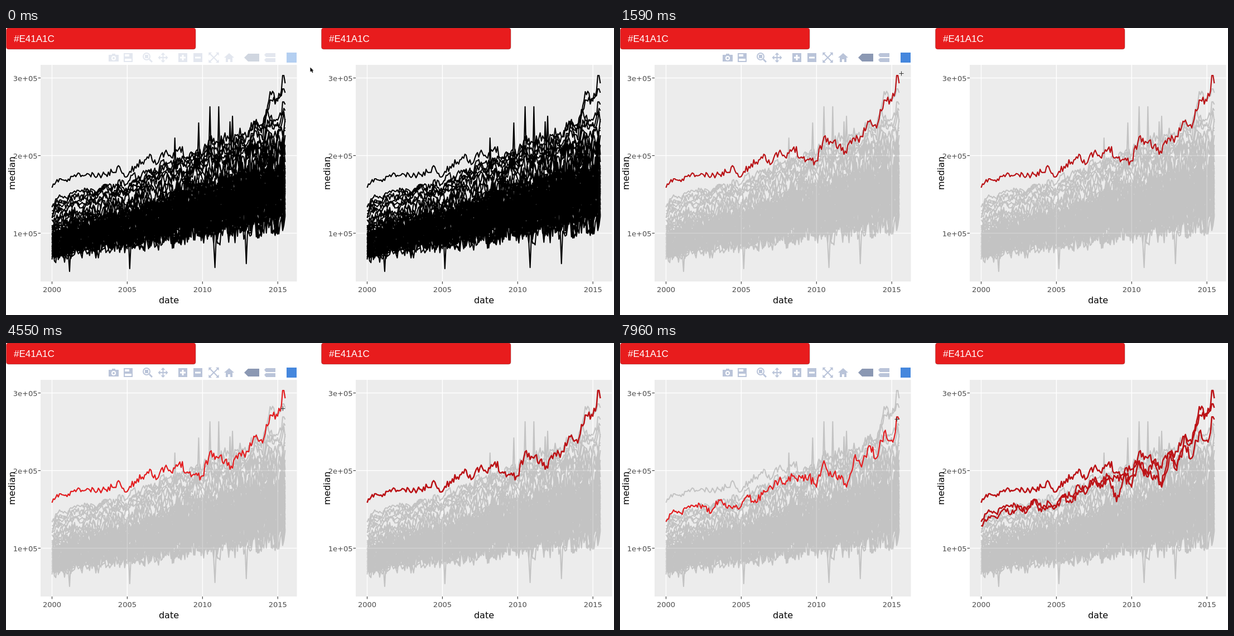
An HTML page with a canvas that plays this animation: 1090x514 px, repeating every 8000 ms.

```html
<!DOCTYPE html>
<html lang="en">
<head>
<meta charset="utf-8">
<title>Linked line charts</title>
<style>
html, body { margin: 0; width: 100%; height: 100%; overflow: hidden; background: #fff; }
canvas { display: block; }
</style>
</head>
<body>
<canvas id="stage" width="1090" height="514"></canvas>
<script>
const ctx = document.getElementById('stage').getContext('2d');
const LOOP = 8000, LAST = 186, X0 = 82.5, STEP = 2.247, RIGHT = 565;
const BRIGHT = '#e61c1f', DARK = '#bc1216', ICON = '#bac4d9';

let seed = 11;
const rnd = () => (seed = (seed * 16807) % 2147483647) / 2147483647;
const jitter = a => (rnd() * 2 - 1) * a;
const months = f => Array.from({ length: LAST + 1 }, (_, m) => f(m, m / LAST));

// Half-yearly heights of the three selectable lines
const keys = [
  [286,270,275,263,264,263,266,262,258,249,266,248,240,226,243,223,
   233,213,231,236,238,195,205,210,224,197,194,168,179,129,131,99],
  [327,311,313,297,306,294,298,280,302,285,294,272,274,255,268,246,
   254,240,284,234,226,216,230,213,254,196,228,170,180,114,126,116],
  [320,299,305,292,290,293,304,281,294,292,292,276,286,264,258,247,
   247,238,242,238,258,211,239,237,258,207,222,184,206,160,174,137]
];
const peaks = [[303,197],[346,170],[366,141],[381,141],[402,168],[406,158]];
const dips = [[114,436],[221,431],[375,429],[430,422]];

function selectable(list, i) {
  const ys = months((m, t) => {
    const k = Math.floor(m / 6), f = m % 6 / 6;
    if (!f) return list[k];
    return list[k] + (list[k + 1] - list[k]) * f + jitter(4 + 7 * t);
  });
  // Every line crests just before it ends
  ys[LAST - 2] = ys[LAST - 1] = ys[LAST] - 14 / (i + 1);
  return ys;
}

function city(start, end, calm, wild, extremes = []) {
  let drift = 0;
  const ys = months((m, t) => {
    drift = drift * 0.7 + jitter(calm / 2);
    const season = -Math.sin((m - 2) / 6 * Math.PI) * (2 + 4 * t);
    const rise = 10 * (1 - Math.exp(-15 * t));
    return start - rise + (end - start + rise) * t ** 1.3 + season + drift + jitter(calm + (wild - calm) * t);
  });
  for (const [x, y] of extremes) ys[Math.round((x - X0) / STEP)] = y;
  return ys;
}

function trace(ys) {
  const p = new Path2D();
  ys.forEach((y, m) => p.lineTo(X0 + m * STEP, y));
  return p;
}

const picks = keys.map((list, i) => trace(selectable(list, i)));
const cities = new Path2D();
picks.forEach(p => cities.addPath(p));
const addCity = (...args) => cities.addPath(trace(city(...args)));
addCity(332, 192, 5, 14, peaks);
addCity(404, 352, 9, 20, dips);
for (let i = 0; i < 3; i++) addCity(318 + i * 8, 152 + i * 14, 5, 11);
for (let i = 0; i < 9; i++) addCity(346 + i * 3, 192 + i * 16, 7, 22);
for (let i = 0; i < 29; i++) addCity(372 + i * 1.35, 215 + (i * 11 % 29) * 2 + i * 3, 9, 27);

// Time, y and x of the pointer; x rests on the line ends
const pointer = [
  [0,70.5,545.5], [570,72,537.5], [750,74,527.5], [930,76.5,518.5], [1170,78.5,512.5], [1590,81.5,504.5],
  [2000,85.5], [2450,89.5], [2720,93.5], [3050,97.5], [3260,101.5], [3440,107.5], [3800,109.5],
  [4040,110.5], [4370,113.5], [4550,117.5], [5480,122.5], [5750,127.5], [6290,130.5],
  [7610,131.5], [7810,133.5], [7960,136.5]
];
const changes = [210, 5180, 6830, ...pointer.map(p => p[0])].sort((a, b) => a - b);

function rect(color, x, y, w, h) {
  ctx.fillStyle = color;
  ctx.fillRect(x, y, w, h);
}

function shape(color, d, x, y) {
  ctx.save();
  ctx.translate(x, y);
  ctx.fillStyle = color;
  ctx.fill(new Path2D(d));
  ctx.restore();
}

function disc(color, x, y, r) {
  ctx.fillStyle = color;
  ctx.beginPath();
  ctx.arc(x, y, r, 0, 7);
  ctx.fill();
}

function plus(color, x, y, r, w) {
  rect(color, x - r, y - w / 2, 2 * r, w);
  rect(color, x - w / 2, y - r, w, 2 * r);
}

function stroke(path, color, width) {
  ctx.strokeStyle = color;
  ctx.lineWidth = width;
  ctx.stroke(path);
}

function text(s, x, y, size, color, align = 'center', family = '"DejaVu Sans", sans-serif') {
  ctx.font = `${size}px ${family}`;
  ctx.fillStyle = color;
  ctx.textAlign = align;
  ctx.fillText(s, x, y);
}

function panel(dimmed) {
  const box = new Path2D();
  box.roundRect(0.5, 0, 339.5, 38, 4);
  ctx.fillStyle = '#e81c1d';
  ctx.fill(box);
  stroke(box, 'rgba(110,60,60,.4)', 1);
  text('#E41A1C', 14, 25, 17, '#fff', 'left', '"Liberation Sans", sans-serif');

  rect('#ececec', 62, 66, 459.5, 388);
  for (let i = 0; i < 4; i++) {
    const x = X0 + i * 134.9;
    rect('#fff', x - 0.7, 66, 1.4, 388);
    rect('#444', x - 0.6, 454, 1.2, 4.5);
    text(2000 + i * 5, x, 472.5, 13, '#4d4d4d');
  }
  for (let i = 1; i < 4; i++) {
    const y = 506.5 - i * 139;
    rect('#fff', 62, y - 0.7, 459.5, 1.4);
    rect('#444', 57.5, y - 0.6, 4.5, 1.2);
    text(i + 'e+05', 56.5, y + 5.5, 13, '#4d4d4d', 'right');
  }
  text('date', 292, 492.5, 16, '#000');
  ctx.save();
  ctx.translate(16, 260);
  ctx.rotate(-Math.PI / 2);
  text('median', 0, 0, 16, '#000');
  ctx.restore();

  ctx.globalAlpha = dimmed ? 0.175 : 1;
  stroke(cities, '#000', 2.1);
  ctx.globalAlpha = 1;
}

// Four arrows pointing away from a centre
function arrows(x, reach, turn) {
  ctx.save();
  ctx.translate(x, 53);
  ctx.rotate(turn);
  for (let i = 0; i < 4; i++) {
    rect(ICON, 0, -1, reach - 3, 2);
    shape(ICON, 'M0 0l-4-4v8z', reach, 0);
    ctx.rotate(Math.PI / 2);
  }
  ctx.restore();
}

function modebar(alpha) {
  // camera
  rect(ICON, 184, 48, 18, 12);
  rect(ICON, 190, 46, 6, 3);
  disc('#fff', 193, 54, 4);
  disc(ICON, 193, 54, 2);
  // disk
  rect(ICON, 211, 45, 16, 16);
  rect('#fff', 213, 47, 8, 4);
  rect('#fff', 213, 55, 12, 4);
  // zoom
  disc(ICON, 252, 51, 7);
  disc('#fff', 252, 51, 5);
  rect(ICON, 249, 48, 6, 6);
  shape(ICON, 'M0 2l2-2 5 5-2 2z', 256, 55);
  arrows(281.5, 9, 0);
  // zoom in and out
  for (const x of [317, 344]) rect(ICON, x - 8, 45, 16, 16);
  plus('#fff', 317, 53, 5, 3);
  rect('#fff', 339, 51.5, 10, 3);
  arrows(372.5, 13, Math.PI / 4);
  // home
  shape(ICON, 'M0 8l9-8 9 8z', 391, 45);
  rect(ICON, 394, 52, 12, 9);
  rect('#fff', 398, 56, 4, 5);
  // hover labels
  shape('#8b98b3', 'M0 7l7-7h20v14h-20z', 427, 46);
  for (const y of [45, 54]) shape(ICON, 'M0 3l3-3h17v7h-17z', 463, y);
  rect('#4587dd', 503, 44, 18, 18);
  // fade towards the page
  rect(`rgba(255,255,255,${1 - alpha})`, 180, 42, 350, 22);
}

function drawPointer(t) {
  const [, y, x = 496.5] = pointer.findLast(p => p[0] <= t);
  if (t < 930) shape('#000', 'M0 0v8l2-1.5 1.5 3 1.5-.6-1.5-3h2.500z', x, y);
  else plus('#333', x, y, 4, 1);
}

function draw(t) {
  const dimmed = t >= 1590;
  const current = t < 5180 ? 0 : t < 6290 ? 1 : 2;
  rect('#fff', 0, 0, 1090, 514);

  panel(dimmed);
  if (dimmed) stroke(picks[current], t < 2000 ? DARK : BRIGHT, 2.1);
  modebar(t < 210 ? 0.4 : t < 930 ? 0 : t < 1170 ? 0.12 : 1);

  ctx.save();
  ctx.translate(RIGHT, 0);
  panel(dimmed);
  if (dimmed) {
    const settled = [2000, 5180, 6830];
    for (let i = 0; i <= current; i++) stroke(picks[i], DARK, t < settled[i] ? 2.1 : 2.5);
  }
  ctx.restore();
  drawPointer(t);
}

ctx.lineJoin = 'round';
let shown = -1;
function tick(now) {
  const step = changes.findLast(c => c <= now % LOOP) ?? 0;
  if (step !== shown) draw(shown = step);
  requestAnimationFrame(tick);
}
tick(0);
</script>
</body>
</html>
```
